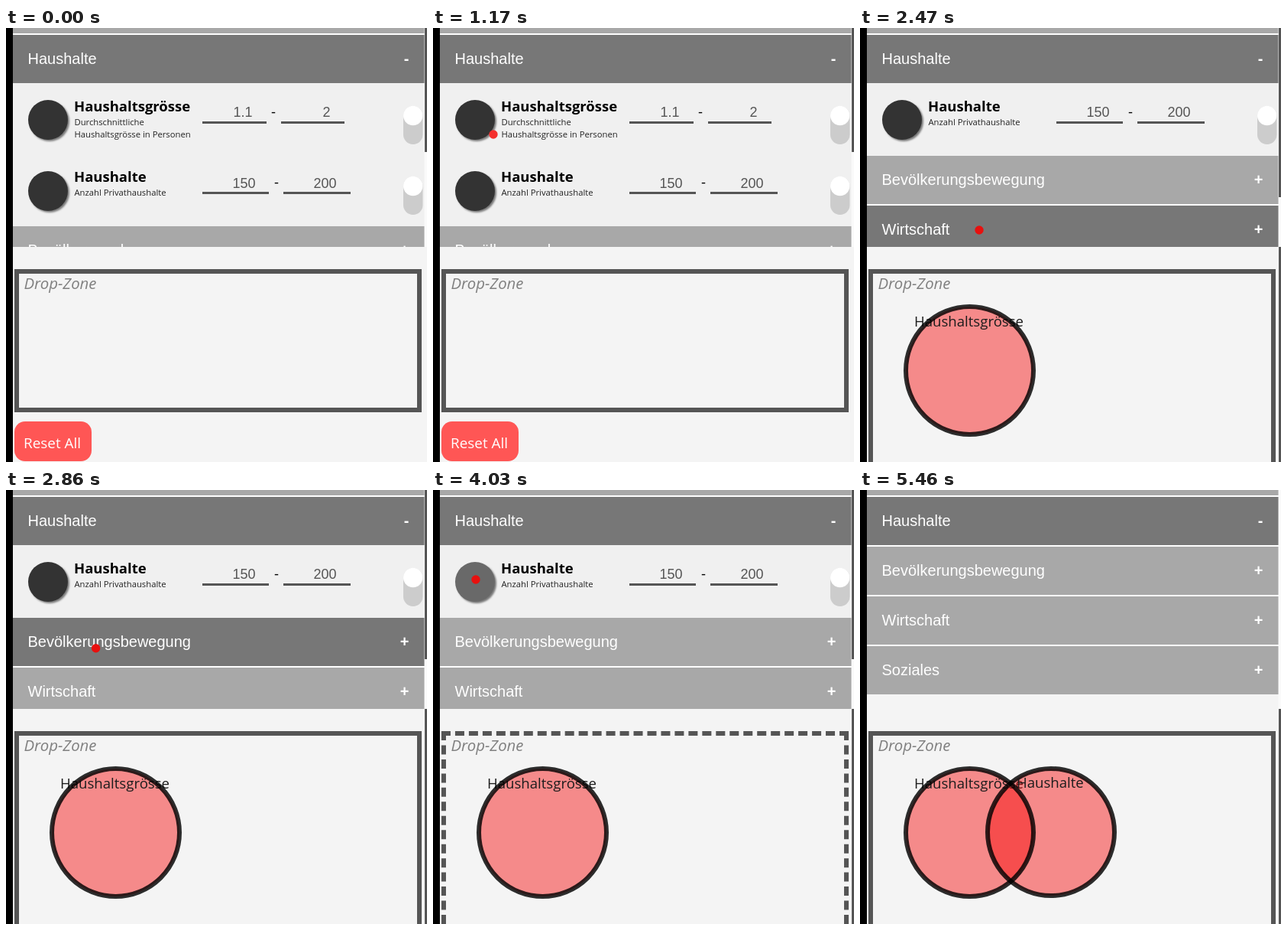
An HTML page that plays this animation: 551 by 567 pixels, repeating every 5.98 s.

```html
<!DOCTYPE html>
<html lang="de">
<head>
<meta charset="utf-8">
<title>Drop-Zone</title>
<style>
  html, body { margin: 0; width: 100%; height: 100%; overflow: hidden; background: #f4f4f4; }
  #stage { position: relative; width: 100%; height: 100%; overflow: clip; }
  #zone {
    position: absolute; left: 11px; top: 315px; width: 533px; height: 187px;
    box-sizing: border-box; border: 6px solid #555;
  }
  #zone.dragging { border-style: dashed; }
  #zone.filled { height: 252px; border-bottom: 0; }
  svg { position: absolute; left: 0; top: 0; width: 100%; height: 100%; }
  text { font-family: "Open Sans", "Noto Sans", sans-serif; font-size: 18.6px; }
  .head { fill: #a8a8a8; }
  .head.on { fill: #777; }
  .head-text { font: 20px "Liberation Sans", Arial, sans-serif; fill: #fff; }
  .sign { font-weight: bold; text-anchor: end; }
  .title { font-size: 18.5px; font-weight: bold; }
  .note { font-size: 11.25px; fill: #222; }
  .num { font: 18px "Liberation Sans", Arial, sans-serif; fill: #555; }
  .line, .thumb { fill: #555; }
  .ball { fill: #333; filter: drop-shadow(2px 2px 1px rgba(0, 0, 0, .5)); }
  .ball.hover { fill: #696969; }
  .hint { font-size: 20.4px; font-style: italic; fill: #808080; }
  .reset { font-size: 18.9px; fill: #fff; }
  .disc { fill: rgba(245, 0, 0, .435); }
  .ring { fill: none; stroke: rgba(0, 0, 0, .82); stroke-width: 6; }
  .label { fill: #1c1c1c; }
</style>
</head>
<body>
<div id="stage">
<div id="zone"></div>
<svg viewBox="0 0 551 567">
  <defs><clipPath id="list"><rect width="551" height="286"/></clipPath></defs>
  <rect width="9" height="567"/>
  <g id="lists" clip-path="url(#list)"></g>
  <text class="hint" x="23.5" y="341">Drop-Zone</text>
  <g id="reset">
    <rect x="11" y="514" width="101" height="52" rx="14" fill="#ff5655"/>
    <text class="reset" x="23" y="549">Reset All</text>
  </g>
  <rect id="pageThumb" class="thumb" x="548" y="286" width="3" height="281"/>
  <g id="first">
    <circle class="disc" cx="143.5" cy="447.5" r="83.5"/>
    <text class="label" x="71" y="390">Haushaltsgrösse</text>
  </g>
  <circle id="disc2" class="disc" cx="250" cy="447" r="83"/>
  <circle id="ring1" class="ring" cx="143.5" cy="447.5" r="83.5"/>
  <g id="second">
    <circle class="ring" cx="250" cy="447" r="83"/>
    <text class="label" x="205" y="389">Haushalte</text>
  </g>
  <circle id="dot" r="5.7"/>
</svg>
</div>
<script>
const LOOP = 5980, STEP = 130;
const $ = id => document.getElementById(id);

const size = {
  title: 'Haushaltsgrösse', notes: ['Durchschnittliche', 'Haushaltsgrösse in Personen'],
  from: ['1.1', 297.5, 84], dash: 347, to: ['2', 414.5, 360, 83]
};
const count = {
  title: 'Haushalte', notes: ['Anzahl Privathaushalte'],
  from: ['150', 296.5, 87], dash: 351, to: ['200', 402.5, 363, 88]
};

const header = (name, y, open) => `
  <rect class="head ${open ? 'on' : ''}" data-y="${y}" x="9" y="${y}" width="538.5" height="63"/>
  <text class="head-text" x="28.5" y="${y + 38}">${name}</text>
  <text class="head-text sign" x="527.5" y="${y + 38}">${open ? '-' : '+'}</text>`;

const row = (r, i) => `<g transform="translate(0 ${i * 92})">
  <circle class="ball" cx="55" cy="${120 + i}" r="26"/>
  <text class="title" x="89" y="109">${r.title}</text>
  ${r.notes.map((n, k) => `<text class="note" x="89.5" y="${127 + k * 16}">${n}</text>`).join('')}
  <text class="num" x="${r.from[1]}" y="${116 + i}">${r.from[0]}</text>
  <rect class="line" x="257" y="122" width="${r.from[2]}" height="3"/>
  <text x="${r.dash}" y="116">-</text>
  <text class="num" x="${r.to[1]}" y="${116 + i}">${r.to[0]}</text>
  <rect class="line" x="${r.to[2]}" y="122" width="${r.to[3]}" height="3"/>
  <rect x="520" y="102" width="25.5" height="50" rx="12.7" fill="#ccc"/>
  <circle cx="532.7" cy="114.5" r="12.7" fill="#fff"/></g>`;

// One accordion state: open rows, then the closed headers from y downwards
const list = (rows, names, y, thumb) => `<g class="list">
  <rect x="547.5" width="4" height="286" fill="#fafafa"/>
  <rect class="thumb" x="548" width="3" height="${thumb}"/>
  <rect class="head" x="9" width="538.5" height="7"/>
  <rect x="9" y="7" width="538.5" height="2" fill="#fff"/>
  <rect x="9" y="72" width="538.5" height="${names.length * 65 + y - 74}" fill="#fff"/>
  ${header('Haushalte', 9, true)}
  ${rows.length ? `<rect x="9" y="72" width="538.5" height="${y - 72}" fill="#f0f0f0"/>` : ''}
  ${rows.map(row).join('')}
  ${names.map((n, i) => header(n, y + i * 65)).join('')}</g>`;

const topics = ['Bevölkerungsbewegung', 'Wirtschaft', 'Soziales'];
$('lists').innerHTML =
  list([size, count], topics.slice(0, 1), 259, 162) +
  list([count], topics.slice(0, 2), 167, 221) +
  list([], topics, 74, 0);
const lists = [...document.querySelectorAll('.list')];

// Pointer path: time, x, y
const path = [
  [260, 300, 540], [910, 104, 180], [1040, 104, 180], [1170, 79, 139],
  [1430, 62, 126], [2340, 62, 126], [2470, 156, 264], [2600, 156, 264],
  [3250, 60, 121], [3380, 56, 117], [4420, 56, 117], [4550, 161, 415],
  [4680, 161, 415], [5330, 140, 556]
];

function pointer(t) {
  const i = path.findIndex(p => p[0] >= t);
  if (i < 0 || t < path[0][0]) return null;
  const b = path[i], a = path[i - 1] || b;
  const k = a === b ? 1 : (t - a[0]) / (b[0] - a[0]);
  return [a[1] + (b[1] - a[1]) * k, a[2] + (b[2] - a[2]) * k];
}

const show = (el, on) => el.style.display = on ? '' : 'none';

function draw(now) {
  const t = Math.floor(now % LOOP / STEP) * STEP;
  const stage = t < 2470 ? 0 : t < 4550 ? 1 : 2;
  const pos = pointer(t);
  const [x, y] = pos || [-99, -99];

  lists.forEach((el, i) => show(el, i === stage));
  show($('reset'), stage === 0);
  ['pageThumb', 'first', 'ring1'].forEach(id => show($(id), stage > 0));
  ['disc2', 'second'].forEach(id => show($(id), stage > 1));

  $('zone').classList.toggle('filled', stage > 0);
  $('zone').classList.toggle('dragging', t >= 1690 && t < 2470 || t >= 3640 && t < 4550);

  lists[stage].querySelectorAll('[data-y]').forEach(el => {
    const top = +el.dataset.y;
    el.classList.toggle('on', top === 9 || y < 286 && y >= top && y < top + 63);
  });
  const ball = lists[stage].querySelector('.ball');
  if (ball) ball.classList.toggle('hover', Math.hypot(x - 55, y - 120) < 26);

  show($('dot'), pos);
  $('dot').setAttribute('transform', `translate(${x} ${y})`);
  $('dot').setAttribute('fill', t >= 3380 && t < 3640 ? '#a02a2a' : stage === 1 ? '#e8100e' : '#f5302e');
}

const start = performance.now();
function tick() {
  draw(performance.now() - start);
  requestAnimationFrame(tick);
}
tick();
</script>
</body>
</html>
```
